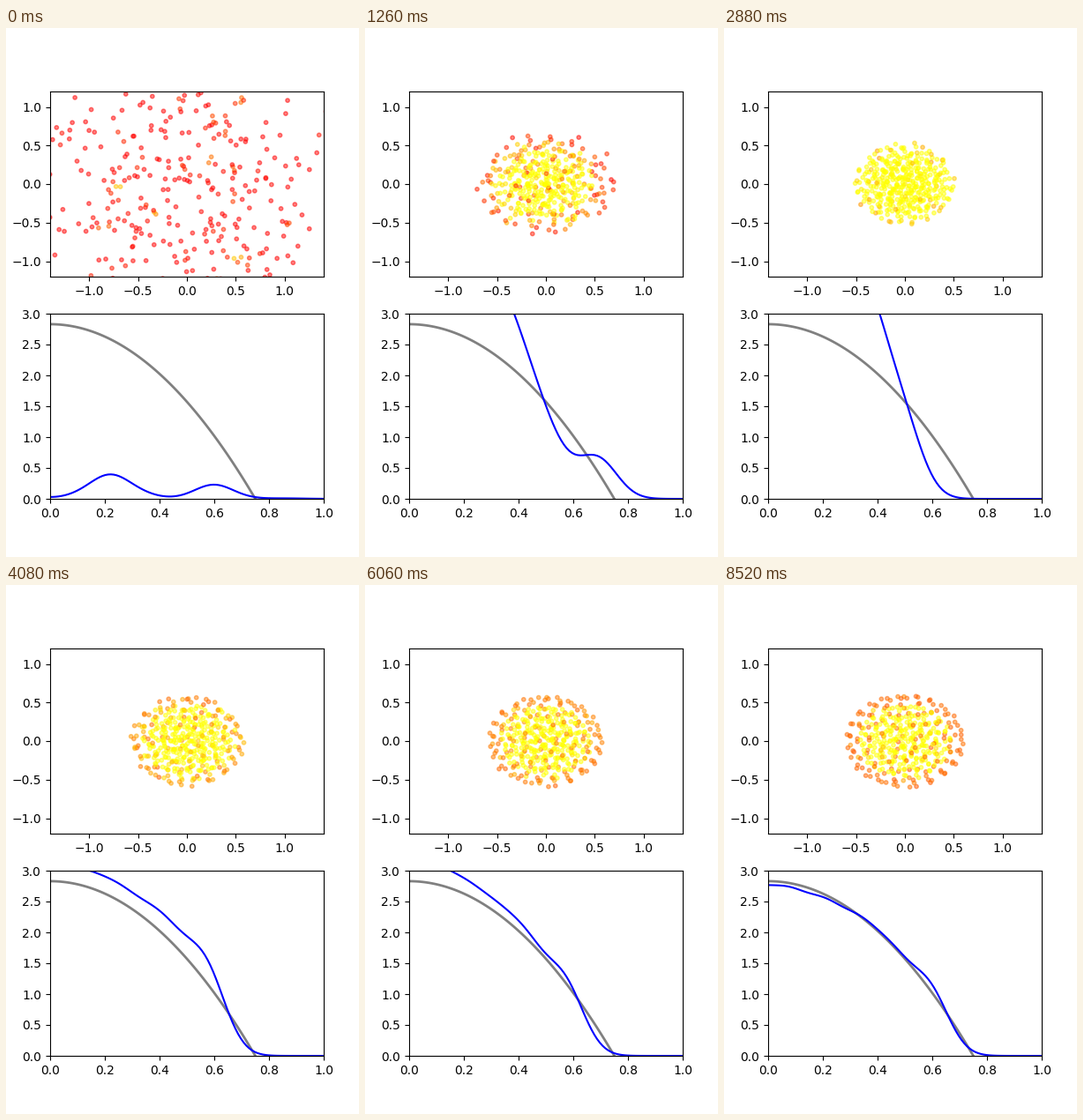
A matplotlib script that plays this animation: 400 by 600 pixels, repeating every 8.58 s.

```python
"""Smoothed-particle star: a random cloud settles into a polytrope."""
import math

import matplotlib.pyplot as plt
import numpy as np
from matplotlib.animation import FuncAnimation

N, FRAMES, DT = 400, 143, 0.07
M, R, H = 2.0, 0.75, 0.1     # star mass, star radius, smoothing length
K, POLY, NU = 0.1, 1, 1.0    # pressure constant, polytropic index, damping
MASS = M / N
LAM = (2 * K * (1 + POLY) * math.pi ** (-3 / (2 * POLY)) / R**2
       * (M * math.gamma(2.5 + POLY) / R**3 / math.gamma(1 + POLY)) ** (1 / POLY))


def separations(a, b):
    return a[:, None, :] - b[None, :, :]


def kernel(d):
    return np.exp(-(d**2).sum(-1) / H**2) / (H * math.sqrt(math.pi)) ** 3


def density(points, pos):
    return MASS * kernel(separations(points, pos)).sum(1)


def acceleration(pos, vel):
    d = separations(pos, pos)
    w = kernel(d)
    rho = MASS * w.sum(1)
    q = K * rho ** (1 + 1 / POLY) / rho**2
    pull = MASS * (q[:, None] + q[None, :]) * (-2 / H**2) * w
    return -(pull[..., None] * d).sum(1) - LAM * pos - NU * vel


def simulate():
    np.random.seed(42)
    pos = np.random.randn(N, 3)
    vel = np.zeros_like(pos)
    acc = acceleration(pos, vel)
    states = [pos.copy()]
    for _ in range(FRAMES + 1):
        vel += acc * DT / 2
        pos += vel * DT
        acc = acceleration(pos, vel)
        vel += acc * DT / 2
        states.append(pos.copy())
    return states


states = simulate()
r = np.linspace(0, 1, 100)
ray = np.column_stack([r, 0 * r, 0 * r])


def shade(pos):
    return np.minimum((density(pos, pos) - 3) / 3, 1)


fig, (top, low) = plt.subplots(2, 1, figsize=(4, 6), dpi=100)
top.set(xlim=(-1.4, 1.4), ylim=(-1.2, 1.2))
low.set(xlim=(0, 1), ylim=(0, 3))

# The colour range stays as set by the starting cloud.
start = shade(states[0])
dots = top.scatter(states[0][:, 0], states[0][:, 1], c=start, cmap="autumn",
                   vmin=start.min(), vmax=start.max(), s=10, alpha=0.5)
low.plot(r, LAM / (4 * K) * (R**2 - r**2), color="gray", linewidth=2)
profile, = low.plot(r, density(ray, states[0]), color="blue")


def update(i):
    pos = states[i + 2]
    dots.set_offsets(pos[:, :2])
    dots.set_array(shade(pos))
    profile.set_ydata(density(ray, pos))
    return dots, profile


anim = FuncAnimation(fig, update, frames=FRAMES, interval=60, repeat=True,
                     repeat_delay=0)
plt.show()
```
